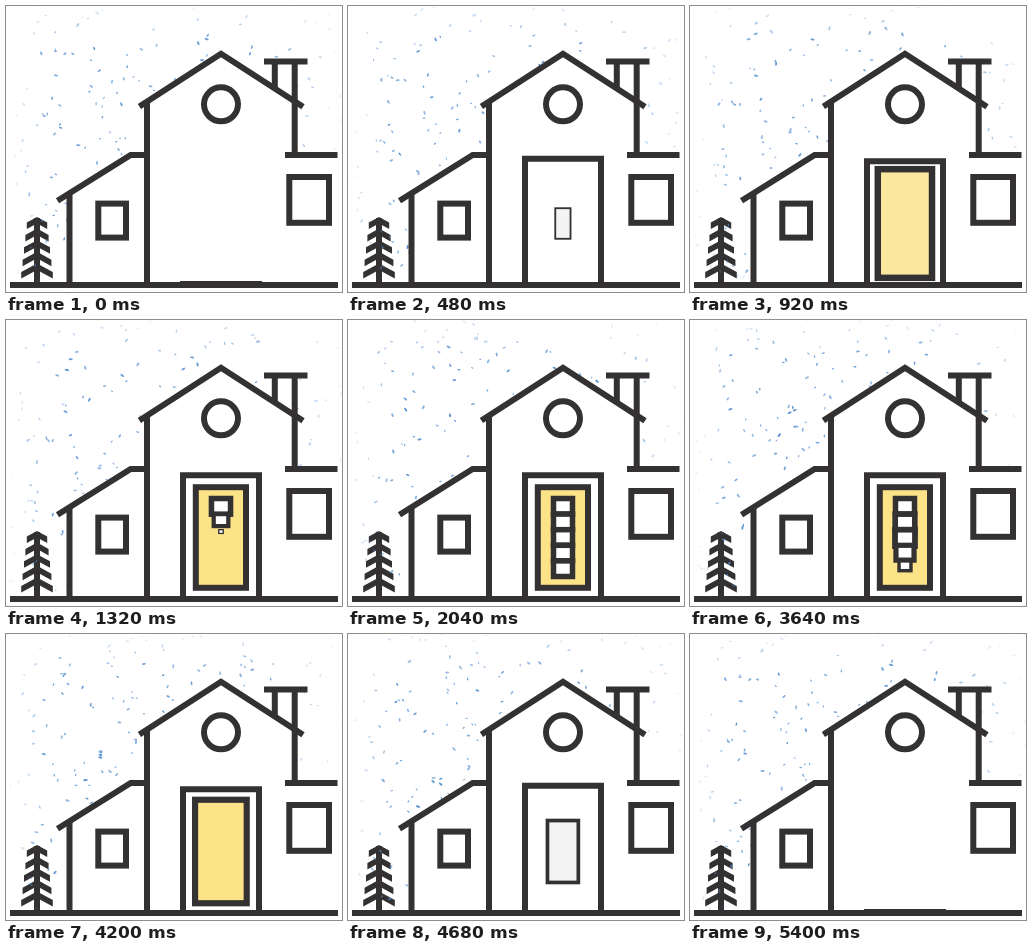
An HTML page with a canvas that plays this animation: 336x286 px, repeating every 5440 ms.

```html
<!DOCTYPE html>
<html lang="en">
<head>
<meta charset="utf-8">
<title>Snowy house</title>
<style>
html, body { margin: 0; width: 336px; height: 286px; overflow: hidden; background: #fff; }
canvas { display: block; }
</style>
</head>
<body>
<canvas id="stage" width="336" height="286"></canvas>
<script>
const ctx = document.getElementById('stage').getContext('2d');
const LOOP = 5440, MIRROR = 5228;
const INK = '#333132', SNOW = '#5590d0';
const GREY = [244, 244, 244], YELLOW = [253, 227, 136];

let seed = 11;
const rand = () => (seed = seed * 16807 % 2147483647) / 2147483647;
const flakes = Array.from({ length: 240 }, () => ({
  x: 345 * rand() ** 1.2, y: rand(), angle: rand() * Math.PI,
  sway: rand() * 6.28, size: 0.7 + rand() * 0.6, tone: 0.6 + rand() * 0.4
}));

const clamp = v => Math.max(0, Math.min(1, v));
const progress = (t, start, length) => clamp((t - start) / length);
// Ease out with overshoot s
const backOut = (p, s = 1.7) => 1 + (s + 1) * (p - 1) ** 3 + s * (p - 1) ** 2;

function trace(pts) {
  ctx.beginPath();
  for (let i = 0; i < pts.length; i += 2) ctx.lineTo(pts[i], pts[i + 1]);
}

function line(...pts) {
  trace(pts);
  ctx.stroke();
}

function shape(fill, ...pts) {
  ctx.fillStyle = fill;
  trace(pts);
  ctx.fill();
}

function box(x, y, w, h, fill) {
  ctx.fillStyle = fill;
  ctx.fillRect(x, y, w, h);
  ctx.strokeRect(x, y, w, h);
}

// Box scaled about a pivot, stroke included
function scaledBox(x, y, w, h, pivotY, scale, fill) {
  if (scale <= 0.01) return;
  ctx.save();
  ctx.translate(x + w / 2, pivotY);
  ctx.scale(scale, scale);
  box(-w / 2, y - pivotY, w, h, fill);
  ctx.restore();
}

function drawSnow(t) {
  ctx.fillStyle = SNOW;
  for (const f of flakes) {
    const p = (f.y + t / LOOP) % 1;
    const x = f.x + 30 - 65 * p + 4 * Math.sin(f.sway + p * 12);
    const y = 300 * p - 6;
    ctx.globalAlpha = f.tone * clamp(x / 45) * clamp((y + 5) / 40) *
      clamp((350 - x) / 100) * clamp((285 - y) / 30);
    ctx.beginPath();
    ctx.ellipse(x, y, 1.7 * f.size, 0.8 * f.size, f.angle + p * 6.28, 0, 7);
    ctx.fill();
  }
  ctx.globalAlpha = 1;
}

function drawHouse() {
  shape('#fff', 63.5, 279, 63.5, 188, 125, 149, 141, 149, 141, 97, 215, 48, 269, 83,
    269, 55, 288.7, 55, 288.7, 149, 336, 149, 336, 279);

  line(63.5, 188, 63.5, 279);
  line(51.5, 194.7, 124.7, 149, 141, 149);
  line(141, 97, 141, 279);
  line(133.4, 100.5, 215, 47.8, 297, 100.7);
  line(268.8, 55, 268.8, 83);
  line(288.7, 55, 288.7, 149);
  line(258, 55.4, 301.5, 55.4);
  line(279, 149, 331.5, 149);
  box(92.3, 197.6, 27.7, 34, '#fff');
  box(283.3, 171, 39.7, 45.8, '#fff');
  ctx.beginPath();
  ctx.arc(215, 98.3, 17, 0, 7);
  ctx.stroke();
}

function drawTree() {
  line(31, 212, 31, 279);
  for (let i = 0; i < 5; i++) {
    const y = 211 + 11.6 * i, w = 10.2 + 1.4 * i, tip = y + 0.55 * w;
    shape(INK, 31, y, 31 + w, tip, 31 + w, tip + 6.5, 31, y + 6.5, 31 - w, tip + 6.5, 31 - w, tip);
  }
}

function drawDoor(t) {
  const top = 278 - 122.7 * backOut(progress(t, 40, 740), 0.9);
  line(177, 279, 177, top, 253, top, 253, 279);

  const warm = progress(t, 620, 380);
  const fill = `rgb(${GREY.map((g, i) => Math.round(g + (YELLOW[i] - g) * warm))})`;
  scaledBox(189.8, 167.2, 50.2, 100.6, 217.5, backOut(progress(t, 431, 700)), fill);

  ctx.lineWidth = 5.5;
  for (let i = 0; i < 5; i++) {
    const y = 178.5 + 15.6 * i;
    scaledBox(205.5, y, 19, 15.6, y, backOut(progress(t, 1090 + 100 * i, 500), 1.2), '#fff');
  }
  ctx.lineWidth = 6;
}

function frame(now) {
  const t = now % LOOP;
  ctx.fillStyle = '#fff';
  ctx.fillRect(0, 0, 336, 286);
  ctx.strokeStyle = INK;
  ctx.lineWidth = 6;
  drawTree();
  drawSnow(t);
  drawHouse();
  drawDoor(Math.min(t, MIRROR - t)); // closing replays the opening backwards
  line(4, 279, 332, 279);
  requestAnimationFrame(frame);
}
frame(performance.now());
</script>
</body>
</html>
```
